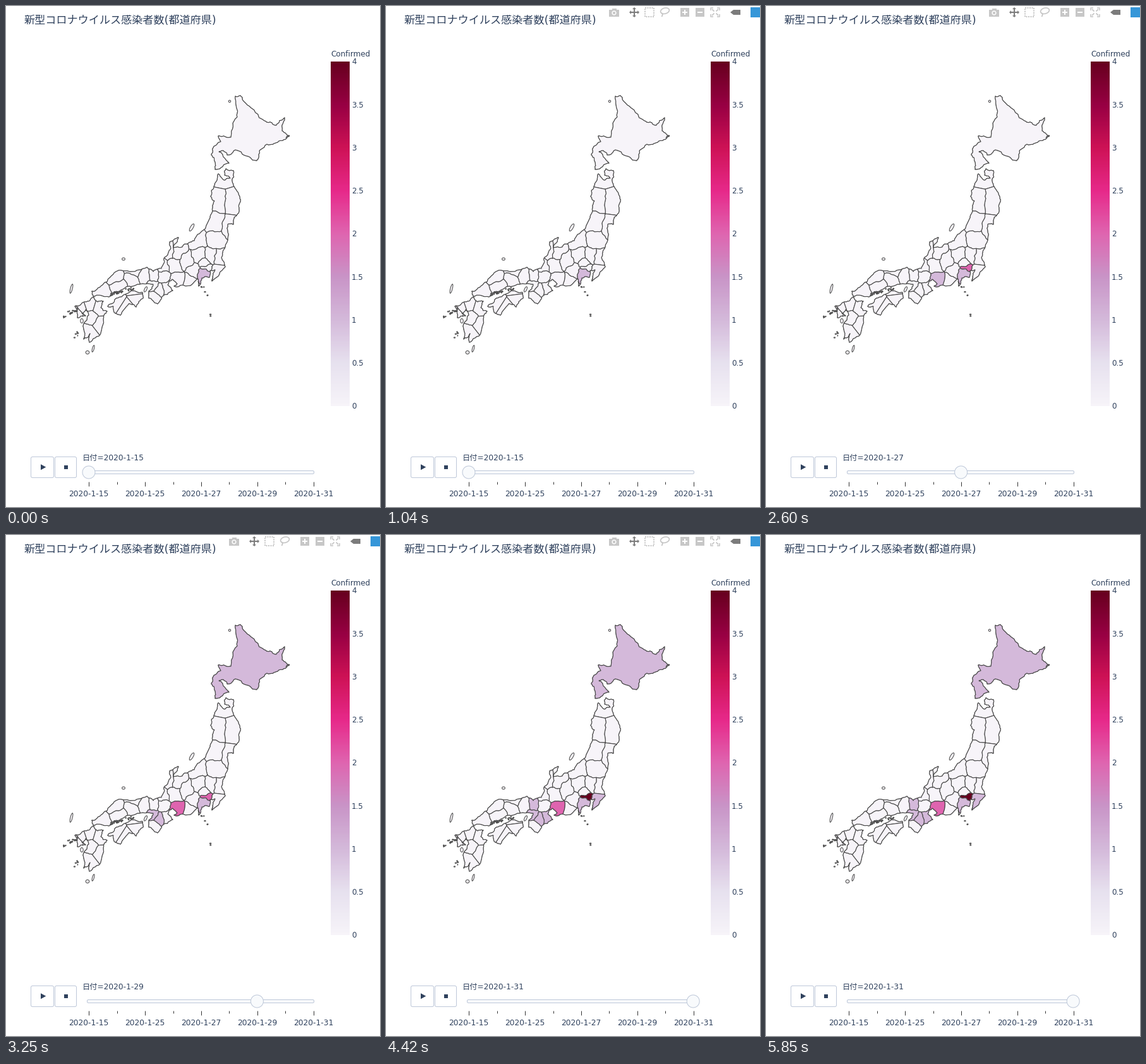
A matplotlib script that plays this animation: 592 by 794 pixels, repeating every 5.98 s.

```python
import random

import matplotlib.pyplot as plt
import numpy as np
from matplotlib.animation import FuncAnimation
from matplotlib.patches import Circle, Ellipse, FancyBboxPatch, Polygon, Rectangle

W, H, DPI = 592, 794, 64
STEP, FRAMES = 130, 46
PX = 72 / DPI
INK, LINE, RAIL, KNOB = "#2f415d", "#484848", "#bec8d9", "#f8fafc"
PALE, DARK = "#c7c7c7", "#7c7c7c"
CMAP = plt.get_cmap("PuRd")
plt.rcParams["font.family"] = ["DejaVu Sans", "Noto Sans CJK JP"]

fig = plt.figure(figsize=(W / DPI, H / DPI), dpi=DPI, facecolor="white")
ax = fig.add_axes([0, 0, 1, 1])

# Key points of the four coasts, clockwise; rough() adds the detail.
HOKKAIDO = [363, 143, 371, 142, 382, 157, 409, 182, 428, 189, 441, 177, 437, 198,
            447, 206, 430, 216, 413, 219, 400, 235, 397, 245, 363, 228, 350, 236,
            344, 229, 337, 231, 353, 249, 331, 259, 331, 247, 325, 236, 327, 226,
            340, 215, 336, 206, 356, 208, 366, 176]
HONSHU = [348, 258, 360, 261, 358, 278, 366, 294, 371, 310, 369, 323, 361, 335,
          360, 346, 351, 346, 351, 371, 341, 399, 347, 413, 335, 429, 326, 436,
          331, 418, 323, 419, 322, 430, 310, 431, 305, 444, 303, 432, 292, 443,
          266, 444, 271, 440, 263, 433, 256, 442, 264, 451, 250, 458, 240, 472,
          226, 463, 226, 452, 233, 441, 208, 441, 182, 450, 163, 461, 138, 460,
          136, 452, 153, 442, 174, 421, 207, 419, 223, 414, 233, 421, 246, 416,
          250, 400, 261, 384, 259, 374, 273, 367, 265, 383, 279, 382, 298, 372,
          317, 348, 327, 325, 330, 309, 324, 302, 329, 287, 333, 278, 336, 266,
          345, 276, 355, 273, 346, 268]
KYUSHU = [139, 461, 145, 469, 154, 468, 150, 478, 160, 484, 154, 496, 147, 523,
          132, 533, 133, 519, 123, 528, 125, 519, 122, 508, 131, 490, 126, 481,
          120, 487, 126, 491, 113, 494, 109, 476, 127, 469]
SHIKOKU = [161, 476, 175, 463, 199, 451, 216, 454, 217, 463, 206, 477, 194, 472,
           181, 490, 172, 486, 170, 476]

# One centre per prefecture; each takes the land nearest to it.
NORTH = dict(aomori=(346, 270), iwate=(357, 308), akita=(337, 308), miyagi=(353, 352),
             yamagata=(332, 347), fukushima=(334, 368), niigata=(302, 370))
EAST = dict(tochigi=(324, 398), ibaraki=(338, 400), gunma=(306, 398), saitama=(314, 408),
            tokyo=(316, 415.5), kanagawa=(314, 421), chiba=(337, 419))
MIDDLE = dict(yamanashi=(299, 418), nagano=(287, 404), toyama=(271, 391),
              shizuoka=(289, 438), aichi=(271, 435), gifu=(267, 411),
              ishikawa=(258, 390), fukui=(247, 414))
WEST = dict(shiga=(247, 429), mie=(254, 446), kyoto=(235, 428), osaka=(233, 443),
            nara=(242, 449), wakayama=(232, 461), hyogo=(219, 430), tottori=(203, 421),
            okayama=(199, 435), shimane=(173, 431), hiroshima=(178, 443),
            yamaguchi=(152, 453))
SOUTH = dict(fukuoka=(132, 473), saga=(119, 477), nagasaki=(111, 485), oita=(148, 478),
             kumamoto=(133, 494), miyazaki=(149, 505), kagoshima=(131, 518))
FOUR = dict(ehime=(177, 469), kochi=(190, 477), kagawa=(206, 452), tokushima=(207, 464))
REGIONS = [(HOKKAIDO, dict(hokkaido=(385, 200))),
           (HONSHU, {**NORTH, **EAST, **MIDDLE, **WEST}),
           (KYUSHU, SOUTH), (SHIKOKU, FOUR)]

# Day of January on which each new case was confirmed
CASES = dict(kanagawa=[15], tokyo=[24, 25, 30, 31], aichi=[26, 28], hokkaido=[28],
             nara=[28], osaka=[29], kyoto=[30], mie=[30], chiba=[31])


def points(flat):
    return np.array(flat, float).reshape(-1, 2)


def rough(p, amp=0.14, limit=1.6):
    """Crinkle a closed path; an edge gets the same shape in either direction."""
    p = np.vstack([p, p[:1]])
    for _ in range(3):
        a, b = p[:-1], p[1:]
        mid = (a + b) / 2
        seed = mid @ [12.9, 78.2]
        size = np.minimum(amp * np.hypot(*(b - a).T), limit)
        mid += np.column_stack([np.sin(seed) * size, np.cos(seed * 1.7) * size])
        out = np.empty((len(a) * 2 + 1, 2))
        out[::2], out[1::2] = p, mid
        p = out
    return p


def cell(centre, others):
    """Part of the stage that is nearer to centre than to any other point."""
    area = points([0, 0, W, 0, W, H, 0, H])
    for other in others:
        normal = other - centre
        side = (area - (other + centre) / 2) @ normal
        kept = []
        for p, q, s, t in zip(area, np.roll(area, -1, 0), side, np.roll(side, -1)):
            if s <= 0:
                kept.append(p)
            if s * t < 0:
                kept.append(p + (q - p) * s / (s - t))
        area = np.array(kept)
    return area


def outlined(path, fill, z):
    return ax.add_patch(Polygon(path, fc=fill, ec=LINE, lw=1.1 * PX,
                                joinstyle="round", zorder=z))


def islet(x, y, rx, ry, angle=0):
    ax.add_patch(Ellipse((x, y), rx * 2, ry * 2, angle=angle, fc=CMAP(0), ec=LINE,
                         lw=PX, zorder=4))


def sprinkle(rng, n, start, end, spread):
    """Scatter n tiny islands along a line."""
    for _ in range(n):
        t = rng.random()
        x, y = (a + (b - a) * t + rng.uniform(-spread, spread) for a, b in zip(start, end))
        islet(x, y, rng.uniform(0.4, 1.3), 0.7)


def text(x, y, s, size=12, ha="left"):
    return ax.text(x, y, s, fontsize=size * PX, color=INK, ha=ha, va="baseline")


def rect(x, y, w, h, color, z=5):
    ax.add_patch(Rectangle((x, y), w, h, fc=color, lw=0, zorder=z))


def poly(flat, color):
    ax.add_patch(Polygon(points(flat), fc=color, lw=0, zorder=5))


def line(flat, color, width=1):
    ax.plot(*points(flat).T, color=color, lw=width * PX, zorder=5, solid_capstyle="butt")


def rounded(x, y, w, h, r, fill):
    ax.add_patch(FancyBboxPatch((x, y), w, h, fc=fill, ec=RAIL, lw=PX, zorder=3,
                                boxstyle=f"round,pad=0,rounding_size={r}"))


def draw_map():
    areas = {}
    for coast, centres in REGIONS:
        shore = rough(points(coast))
        land = outlined(shore, CMAP(0), 1)
        spots = {name: np.array(c, float) for name, c in centres.items()}
        for name, c in spots.items():
            others = [o for key, o in spots.items() if key != name]
            areas[name] = outlined(rough(cell(c, others)), CMAP(0), 2)
            areas[name].set_clip_path(land)
        outlined(shore, "none", 3)
    return areas


def draw_islets():
    islet(294, 351, 2.2, 6.5, 30)
    islet(221, 449, 1.8, 4.5, 25)
    islet(103.5, 448, 1.6, 7.5, 14)
    islet(138, 543, 1.4, 5.5, 15)
    islet(129, 549, 2.8, 2.6)
    islet(354, 151, 1.7, 1.7)
    islet(186, 401, 2.4, 2)
    islet(120, 499, 2.2, 3.5)
    rng = random.Random(4)
    sprinkle(rng, 34, (166, 457), (203, 447), 2)
    sprinkle(rng, 22, (89, 492), (113, 480), 3)
    sprinkle(rng, 6, (115, 514), (109, 528), 2)
    sprinkle(rng, 5, (440, 209), (450, 205), 1)
    sprinkle(rng, 6, (311, 443), (320, 460), 2)
    sprinkle(rng, 2, (323, 480), (324, 495), 0)


def draw_scale():
    ramp = np.linspace(1, 0, 546)[:, None]
    ax.imshow(ramp, cmap=CMAP, vmin=0, vmax=1, extent=[514, 544, 634, 88], aspect="auto")
    text(514, 80, "Confirmed")
    for k in range(9):
        text(547, 638.3 - 68.25 * k, f"{k / 2:g}")


def draw_toolbar():
    # camera
    rect(353, 5.5, 16, 11, PALE)
    rect(357.5, 3.5, 7, 3, PALE)
    ax.add_patch(Circle((361, 11), 3.6, fc="white", lw=0, zorder=6))
    ax.add_patch(Circle((361, 11), 2.1, fc=PALE, lw=0, zorder=7))
    # pan
    line([393, 4, 393, 16], DARK, 2)
    line([387, 10, 399, 10], DARK, 2)
    for d in points([1, 0, -1, 0, 0, 1, 0, -1]):
        mid, side = np.array([393, 10]), d[::-1] * 3
        poly([mid + 8 * d, mid + 5 * d + side, mid + 5 * d - side], DARK)
    # box select
    ax.add_patch(Rectangle((410, 3), 14, 14, fc="none", ec=PALE, lw=2 * PX,
                           ls=(0, (1, 0.75)), zorder=5))
    # lasso
    ax.add_patch(Ellipse((441.5, 7.7), 14, 9, angle=-15, fc="none", ec=PALE,
                         lw=1.7 * PX, zorder=5))
    line([436, 11, 438, 13, 436.5, 17], PALE, 1.8)
    # zoom in and out
    for x in (466, 490):
        rect(x, 3, 14, 14, PALE)
        rect(x + 3, 9, 8, 2, "white", 6)
    rect(472, 6, 2, 8, "white", 6)
    # autoscale
    for sx in (-1, 1):
        for sy in (-1, 1):
            cx, cy = 521 + 7 * sx, 10 + 7 * sy
            line([cx - 4 * sx, cy, cx, cy, cx, cy - 4 * sy], PALE, 1.6)
            line([521 + 1.5 * sx, 10 + 1.5 * sy, 521 + 5 * sx, 10 + 5 * sy], PALE, 1.8)
    # tag
    poly([545, 10, 550, 6, 561, 6, 561, 14, 550, 14], DARK)
    rect(577, 2, 16, 16, "#3596d8")


def draw_slider():
    rounded(39.5, 714.5, 36, 33, 2.5, "white")
    rounded(77.5, 714.5, 34, 33, 2.5, "white")
    poly([55, 726.3, 63.3, 730.8, 55, 735.3], INK)
    rect(92, 728, 6, 6, INK)
    rounded(128.5, 736.5, 359, 5, 2, KNOB)
    for k, day in enumerate(DATES):
        x = int(130.9 + 44.4 * k) + 0.5
        line([x, 754, x, 758 if k % 2 else 761], "#333333")
        if k % 2 == 0:
            text(x + 0.5, 777, f"2020-1-{day}", 12.3, "center")


DATES = [15, *range(24, 32)]
# Frames at which the date changes, and at which map and knob follow
LABEL_AT = np.array([0, 11, 14, 17, 20, 23, 25, 29, 33])
SHOW_AT = np.array([0, 12, 15, 18, 20, 23, 25, 29, 34])

areas = draw_map()
draw_islets()
draw_scale()
draw_toolbar()
draw_slider()
text(28.5, 27.5, "新型コロナウイルス感染者数(都道府県)", 17.1)
label = text(120.5, 720, "", 12.25)
knob = ax.add_patch(Circle((131, 739), 10, fc=KNOB, ec=RAIL, lw=PX, zorder=6))
veil = ax.add_patch(Rectangle((345, 0), 247, 21, fc="white", lw=0, zorder=9))
ax.set(xlim=(0, W), ylim=(H, 0))
ax.axis("off")


def update(i):
    named = np.sum(LABEL_AT <= i) - 1
    shown = np.sum(SHOW_AT <= i) - 1
    label.set_text(f"日付=2020-1-{DATES[named]}")
    knob.center = (131 + 44.4 * shown, 739)
    for name, days in CASES.items():
        count = sum(day <= DATES[shown] for day in days)
        areas[name].set_facecolor(CMAP(count / 4))
    toolbar = np.clip((i - 2) / 3, 0, 1) * np.clip((45 - i) / 4, 0, 1)
    veil.set_alpha(1 - toolbar)
    return label, knob, veil, *areas.values()


anim = FuncAnimation(fig, update, frames=FRAMES, interval=STEP,
                     init_func=lambda: update(0), repeat=True, repeat_delay=0)
plt.show()
```
